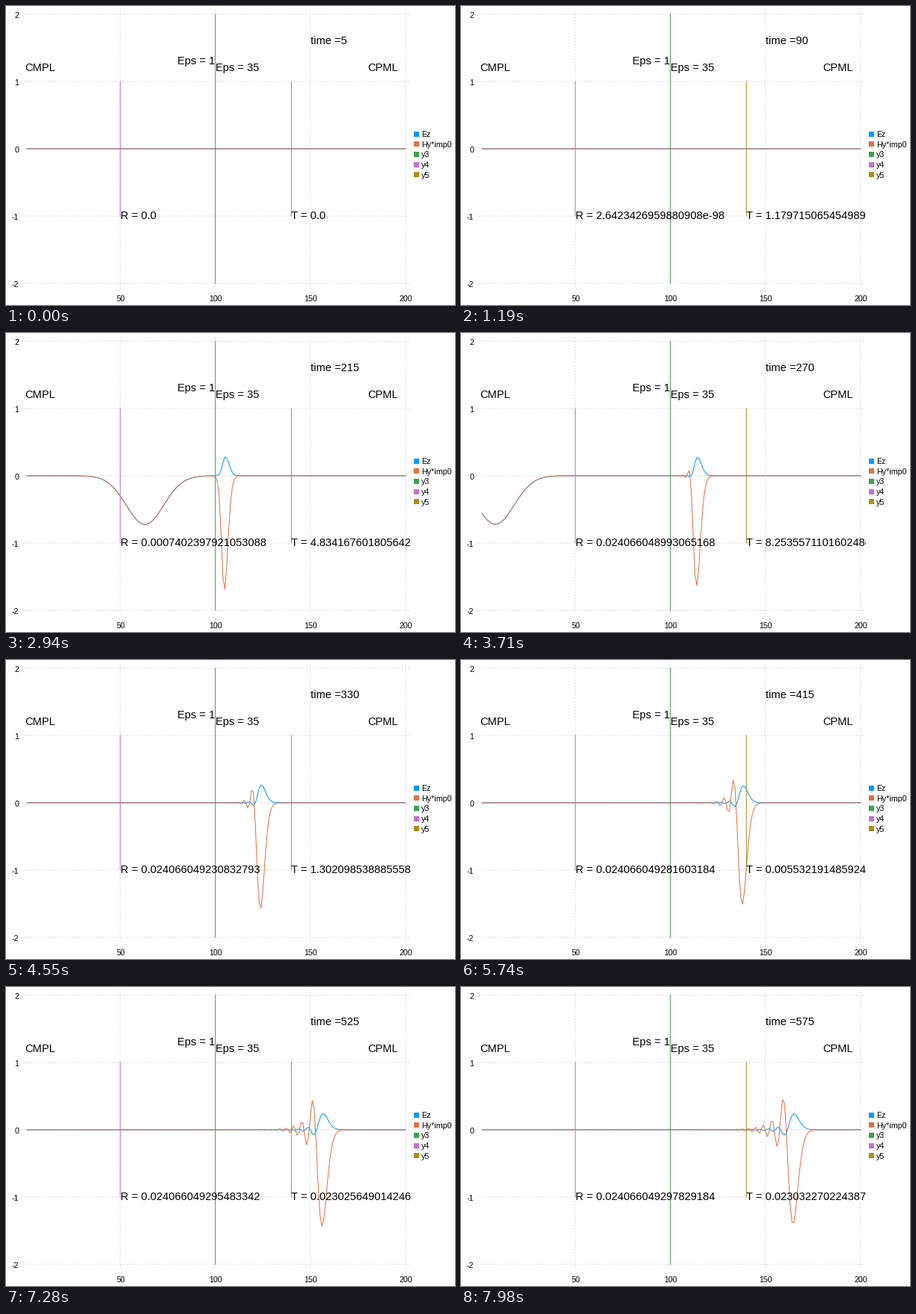
Write a matplotlib script that moves like this. It is 600 px wide and 400 px high and loops after 8000 ms.

```python
import numpy as np
import matplotlib.pyplot as plt
from matplotlib.animation import FuncAnimation
from matplotlib.patches import Rectangle

W, H, DPI = 600, 400, 100
PX = 72 / DPI                      # points per pixel
STEP_MS, TICK_MS, LOOP_MS = 70, 20, 8000
SHOTS = 115                        # pictures in a loop, five time steps apart

N, IMP0, EPS = 200, 377.0, 35.0
SRC, SLAB, PROBE_R, PROBE_T = 70, 100, 50, 140

BLUE, ORANGE, GREEN = "#009afa", "#e36f47", "#3da44d"
PURPLE, GOLD = "#c371d2", "#ac8e18"


def pulse(t):
    return np.exp(-((t - 150.0) ** 2) / 200.0)


def simulate():
    """1D FDTD run with a one-way source; index 0 of each array is unused."""
    ez, hy = np.zeros(N + 1), np.zeros(N + 1)
    gain = np.full(N + 1, IMP0)
    gain[SLAB:] /= EPS
    refl = trans = 0.0
    shots = []
    for t in range(1, 5 * SHOTS + 1):
        hy[1:N] += (ez[2:] - ez[1:N]) / IMP0
        hy[SRC - 1] -= pulse(t) / IMP0
        edge = ez[2]
        ez[2:N] += (hy[2:N] - hy[1:N - 1]) * gain[2:N]
        ez[SRC] += pulse(t + 1)
        ez[1] = edge
        refl += ez[PROBE_R] * hy[PROBE_R - 1]
        trans -= ez[PROBE_T] * hy[PROBE_T - 1]
        if t % 5 == 0:
            shots.append((t, ez[1:].copy(), hy[1:] * IMP0, abs(refl), abs(trans)))
    return shots


shots = simulate()

plt.rcParams["font.family"] = "Liberation Sans"
fig = plt.figure(figsize=(W / DPI, H / DPI), dpi=DPI, facecolor="white")

# plot area in pixels, with limits widened by 1.5 % on each side
L, R, T, B = 20.6, 541.4, 5.6, 376.4
ax = fig.add_axes([L / W, 1 - B / H, (R - L) / W, (B - T) / H])
ax.set_xlim(1 - 0.015 * 199, 200 + 0.015 * 199)
ax.set_ylim(-2.06, 2.06)
ax.axis("off")


def note(x, y, s):
    return ax.text(x, y - 0.047, s, size=14.6 * PX, va="baseline",
                   clip_on=True, zorder=5)


def label(x, y, s, ha="left"):
    fig.text(x / W, 1 - y / H, s, size=10.67 * PX, ha=ha, va="baseline")


def line(xs, ys, color, z=2, **kw):
    return ax.plot(xs, ys, color=color, lw=1 * PX, zorder=z, snap=False, **kw)[0]


grid = dict(z=1, dashes=(2, 2), dash_capstyle="butt")
for v in (50, 100, 150, 200):
    line([v, v], [-2.06, 2.06], "#d8d8d8", **grid)
    label(280 + (v - 100) * 2.54, 395, str(v), "center")
for v in range(-2, 3):
    line([-2, 203], [v, v], "#d8d8d8", **grid)
    label(17, 195.5 - 90 * v, str(v), "right")

xs = np.arange(1, N + 1)
ez_line = line(xs, 0 * xs, BLUE)
hy_line = line(xs, 0 * xs, ORANGE)
line([SLAB, SLAB], [-2, 2], GREEN)
line([PROBE_R, PROBE_R], [-1, 1], PURPLE)
line([PROBE_T, PROBE_T], [-1, 1], GOLD)

note(0, 1.2, "CMPL")
note(180, 1.2, "CPML")
note(80, 1.3, "Eps = 1")
note(100, 1.2, "Eps = 35")
time_note = note(150, 1.6, "")
refl_note = note(PROBE_R, -1, "")
trans_note = note(PROBE_T, -1, "")

names = ("Ez", "Hy*imp0", "y3", "y4", "y5")
for i, (name, color) in enumerate(zip(names, (BLUE, ORANGE, GREEN, PURPLE, GOLD))):
    y = 171 + 13.7 * i
    fig.add_artist(Rectangle((545 / W, 1 - (y + 3.5) / H), 7 / W, 7 / H,
                             color=color, lw=0))
    label(555.4, y + 4, name)


def draw(i):
    k = min((i * TICK_MS + TICK_MS // 2) // STEP_MS, SHOTS - 1)
    t, ez, hy, refl, trans = shots[k]
    ez_line.set_ydata(ez)
    hy_line.set_ydata(hy)
    time_note.set_text(f"time ={t}")
    refl_note.set_text(f"R = {float(refl)!r}")
    trans_note.set_text(f"T = {float(trans)!r}")
    return ez_line, hy_line, time_note, refl_note, trans_note


anim = FuncAnimation(fig, draw, frames=LOOP_MS // TICK_MS, interval=TICK_MS,
                     init_func=lambda: draw(0), repeat=True, repeat_delay=0)
plt.show()
```
